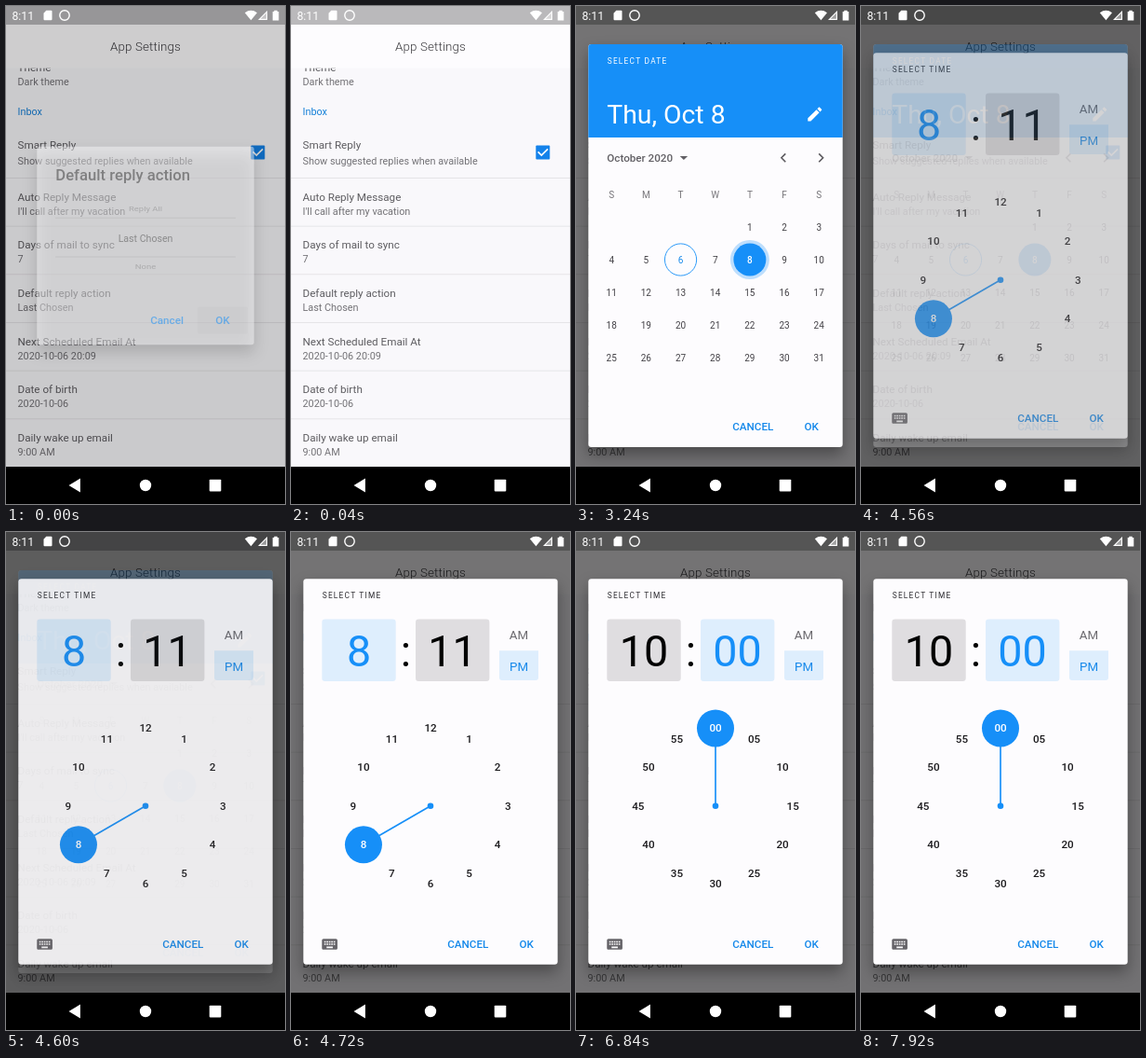
Recreate the animation shown at these times as an HTML page. Size 300 px wide and 534 px high, loop 8000 ms.

```html
<!DOCTYPE html>
<html lang="en">
<head>
<meta charset="utf-8">
<title>App settings pickers</title>
<style>
html, body { margin: 0; width: 100%; height: 100%; overflow: hidden; background: #000; }
svg { display: block; width: 100vw; height: 100vh; }
text { font-family: Roboto, "Open Sans", sans-serif; white-space: pre; }
.dialog { filter: drop-shadow(0 8px 8px rgba(0, 0, 0, .34)); }
</style>
</head>
<body>
<svg id="stage" viewBox="0 0 300 534" xmlns="http://www.w3.org/2000/svg"></svg>
<script>
const LOOP = 8000, STEP = 40;
const BLUE = '#168ff8', PAPER = '#fdfcfe', TINT = '#deeefd', GREY = '#dfdde0';
const CX = 150, CY = 293.7, DIAL = 83.2, KNOB = 20;
const BODY = 11.67;

const stage = document.getElementById('stage');
const $ = id => document.getElementById(id);

function attrs(o) {
  return Object.entries(o).map(([k, v]) => ` ${k}="${v}"`).join('');
}
function text(s, x, y, size, fill, more = {}) {
  return `<text${attrs({ x, y, 'font-size': size, fill, ...more })}>${s}</text>`;
}
function rect(x, y, width, height, fill, more = {}) {
  return `<rect${attrs({ x, y, width, height, fill, ...more })}/>`;
}
function circle(cx, cy, r, fill, more = {}) {
  return `<circle${attrs({ cx, cy, r, fill, ...more })}/>`;
}
function path(d, more = {}) {
  return `<path${attrs({ d, ...more })}/>`;
}
const MID = { 'text-anchor': 'middle' };
const MEDIUM = { 'font-weight': 500 };
const MID_MEDIUM = { ...MID, ...MEDIUM };

function settings() {
  const title = (s, y) => text(s, 12.5, y, BODY, '#5e5d61');
  const note = (s, y) => text(s, 12.5, y, 10.83, '#737276');
  const rows = [
    ['Auto Reply Message', 'I\'ll call after my vacation'],
    ['Days of mail to sync', '7'],
    ['Default reply action', 'Last Chosen'],
    ['Next Scheduled Email At', '2020-10-06 20:09'],
    ['Date of birth', '2020-10-06'],
    ['Daily wake up email', '9:00 AM']
  ];
  let out = rect(0, 0, 300, 494, '#f9f8fb');
  out += title('Theme', 70.3) + note('Dark theme', 85.2);
  out += text('Inbox', 12.5, 117.3, 10.83, '#1580d8');
  out += title('Smart Reply', 153.3) + note('Show suggested replies when available', 170.4);
  out += rect(263.3, 149.5, 15, 15, '#1482ea', { rx: 1 });
  out += path('M265.6 156.3l3.7 3.7 6.8-6.7', { fill: 'none', stroke: '#fff', 'stroke-width': 1.67 });
  rows.forEach(([head, sub], i) => {
    const y = 184.4 + i * 51.67;
    out += rect(0, y - .4, 300, .9, '#e4e3e6') + title(head, y + 24.2) + note(sub, y + 39.2);
  });
  out += rect(0, 0, 300, 66.7, PAPER);
  out += text('App Settings', 150, 48, 13.33, '#3c3b3f',
    { ...MID, 'font-weight': 300, 'letter-spacing': .15 });
  return out + rect(0, 0, 300, 20, '#bab9bb');
}

function systemBars() {
  return text('8:11', 6.5, 14.7, 12.2, '#fff') +
    path('M43.3 4.8h5.2q1 0 1 1v8.4q0 1-1 1h-7q-1 0-1-1v-6.4z', { fill: '#fff' }) +
    circle(63, 10, 5.2, 'none', { stroke: '#fff', 'stroke-width': 1.4 }) +
    path('M256.8 7.2q6.6-4.7 13.2 0l-6.6 8z', { fill: '#fff' }) +
    path('M281 5.2v9.8h-9.8z', { fill: '#fff', 'fill-opacity': .45 }) +
    path('M280.4 6.4v8h-8z', { fill: 'none', stroke: '#fff', 'stroke-width': 1.1 }) +
    path('M288.3 4.8h3.4v1.1h1.6v9.6h-6.6v-9.6h1.6z', { fill: '#fff' }) +
    rect(0, 494, 300, 40, '#000') +
    path('M67.5 514l12.4-7.4v14.8z', { fill: '#fff' }) +
    circle(150, 514, 6.2, '#fff') +
    rect(218.7, 507.8, 12.6, 12.6, '#fff', { rx: .8 });
}

function replyDialog() {
  const line = y => rect(53, y, 194, .8, '#777', { opacity: .2 });
  const squashed = (s, y) =>
    `<g transform="translate(150 ${y}) scale(1 .68)">${text(s, 0, 0, 9.5, '#555', { ...MID, opacity: .3 })}</g>`;
  return `<g class="dialog">${rect(33.3, 150.7, 233.4, 212.6, PAPER, { rx: 3, opacity: .45 })}</g>` +
    text('Default reply action', 53.3, 186.7, 16.67, '#333', { ...MEDIUM, opacity: .5 }) +
    squashed('Reply All', 219.7) + line(226.8) +
    text('Last Chosen', 150, 252.6, 10.6, '#444', { ...MID, opacity: .5 }) +
    line(268.6) + squashed('None', 282.2) +
    rect(206, 322.5, 54, 29, '#888', { rx: 2, opacity: .06 }) +
    text('Cancel', 173, 341, BODY, BLUE, { ...MID_MEDIUM, opacity: .55 }) +
    text('OK', 233, 341, BODY, BLUE, { ...MID_MEDIUM, opacity: .55 });
}

function actions(y) {
  return text('CANCEL', 190.3, y, BODY, '#1488ea', MID_MEDIUM) +
    text('OK', 253.2, y, BODY, '#1488ea', MID_MEDIUM);
}
function overline(s, y, fill) {
  return text(s, 33.7, y, 8.33, fill, { 'letter-spacing': 1.25 });
}

const dayX = col => 38.2 + col * 37.17;

function dateDialog() {
  let out = `<g class="dialog">${rect(13.3, 41, 273.4, 432, PAPER, { rx: 3.3 })}</g>`;
  out += path('M13.3 141V44.3q0-3.3 3.3-3.3h266.8q3.3 0 3.3 3.3V141z', { fill: BLUE });
  out += overline('SELECT DATE', 61.8, '#fff');
  out += text('', 33.3, 126.4, 28.33, '#fff', { id: 'headline' });
  out += path('M3 17.25V21h3.75L17.81 9.94l-3.75-3.75L3 17.25zM20.71 7.04c.39-.39.39-1.02 0-1.41l-2.34-2.34c-.39-.39-1.02-.39-1.41 0l-1.83 1.83 3.75 3.75 1.83-1.83z',
    { fill: '#fff', transform: 'translate(246.8 106) scale(.833)' });
  out += text('October 2020', 33.3, 166.9, BODY, '#615f64', MEDIUM);
  out += path('M111.7 160.9h8.4l-4.2 4.2z', { fill: '#615f64' });
  const arrow = { fill: 'none', stroke: '#5b595e', 'stroke-width': 1.6 };
  out += path('M225.3 158.4l-4.4 4.4 4.4 4.4', arrow) + path('M261.2 158.4l4.4 4.4-4.4 4.4', arrow);
  [...'SMTWTFS'].forEach((d, i) => out += text(d, dayX(i), 205.5, 10, '#77757a', MID));
  out += circle(dayX(4), 272, 21, BLUE, { id: 'halo' });
  out += circle(dayX(2), 272, 17.1, 'none', { id: 'today', stroke: BLUE, 'stroke-width': .9 });
  out += circle(0, 272, 17.5, BLUE, { id: 'picked' });
  for (let d = 1; d <= 31; d++) {
    const cell = d + 3;
    out += text(d, dayX(cell % 7), 240.6 + Math.floor(cell / 7) * 35, 10, '#434146',
      { ...MID, id: 'day' + d });
  }
  return out + actions(455.3);
}

function timeDialog() {
  const big = (s, x, more) => text(s, x, 143.7, 46.67, '#000', { ...MID, ...more });
  const labels = (name, fill) => {
    let out = '';
    for (let i = 0; i < 12; i++) {
      const a = i * Math.PI / 6;
      out += text('', CX + DIAL * Math.sin(a), CY - DIAL * Math.cos(a) + 3.9, BODY, fill,
        { ...MID_MEDIUM, id: name + i });
    }
    return out;
  };
  return `<g class="dialog">${rect(13.3, 50.3, 273.4, 413.4, PAPER, { rx: 3.3 })}</g>` +
    overline('SELECT TIME', 71, '#2f2e32') +
    rect(33.3, 93.6, 79.4, 66.4, TINT, { id: 'hourBox', rx: 3.3 }) + big('', 73, { id: 'hour' }) +
    big(':', 123.3) +
    rect(134, 93.6, 79.4, 66.4, GREY, { id: 'minBox', rx: 3.3 }) + big('', 173.6, { id: 'minute' }) +
    path('M224 127.3h42v28.7q0 3-3 3h-36q-3 0-3-3z', { fill: TINT }) +
    text('AM', 245, 115.2, 13.33, '#6b696e', MID) +
    text('PM', 245, 148.9, 13.33, '#1488ea', MID) +
    labels('dark', '#1c1b1e') +
    circle(CX, CY, 3.3, BLUE) +
    `<line id="hand" x1="${CX}" y1="${CY}" stroke="${BLUE}" stroke-width="1.67"/>` +
    circle(0, 0, KNOB, BLUE, { id: 'knob' }) +
    circle(0, 0, 1.7, '#fff', { id: 'pip' }) +
    `<clipPath id="knobClip">${circle(0, 0, KNOB, '#000', { id: 'knobHole' })}</clipPath>` +
    `<g clip-path="url(#knobClip)">${labels('light', '#fff')}</g>` +
    path('M20 5H4c-1.1 0-1.99.9-1.99 2L2 17c0 1.1.9 2 2 2h16c1.1 0 2-.9 2-2V7c0-1.1-.9-2-2-2zm-9 3h2v2h-2V8zm0 3h2v2h-2v-2zM8 8h2v2H8V8zm0 3h2v2H8v-2zm-1 2H5v-2h2v2zm0-3H5V8h2v2zm9 7H8v-2h8v2zm0-4h-2v-2h2v2zm0-3h-2V8h2v2zm3 3h-2v-2h2v2zm0-3h-2V8h2v2z',
      { fill: '#666469', transform: 'translate(31.6 432) scale(.833)' }) +
    actions(446);
}

stage.innerHTML = settings() +
  rect(0, 0, 300, 494, '#000', { id: 'scrim' }) +
  `<g id="reply">${replyDialog()}</g>` +
  `<g id="date">${dateDialog()}</g>` +
  `<g id="time">${timeDialog()}</g>` +
  systemBars();

function set(id, o) {
  const el = $(id);
  for (const k in o) el.setAttribute(k, o[k]);
}
function show(id, opacity) {
  set(id, { opacity, display: opacity > 0 ? 'inline' : 'none' });
}

// Linear interpolation through [time, value] stops.
function track(t, stops) {
  if (t <= stops[0][0]) return stops[0][1];
  for (let i = 1; i < stops.length; i++) {
    const [t0, a] = stops[i - 1], [t1, b] = stops[i];
    if (t <= t1) return a + (b - a) * (t - t0) / (t1 - t0);
  }
  return stops[stops.length - 1][1];
}

// cubic-bezier(.4, 0, .2, 1)
function ease(x) {
  let lo = 0, hi = 1;
  for (let i = 0; i < 24; i++) {
    const s = (lo + hi) / 2, r = 1 - s;
    if (1.2 * r * r * s + .6 * r * s * s + s * s * s < x) lo = s; else hi = s;
  }
  return lo * lo * (3 - 2 * lo);
}

function drawDate(t) {
  const moved = t >= 3240;
  $('headline').textContent = moved ? 'Thu, Oct 8' : 'Tue, Oct 6';
  set('picked', { cx: dayX(moved ? 4 : 2) });
  show('today', moved ? 1 : 0);
  show('halo', moved ? track(t, [[3240, .28], [3400, 0]]) : 0);
  set('day6', { fill: moved ? '#1488ea' : '#fff', 'font-weight': moved ? 400 : 500 });
  set('day8', { fill: moved ? '#fff' : '#434146', 'font-weight': moved ? 500 : 400 });
}

function drawTime(t) {
  const minutes = t >= 5920;
  $('hour').textContent = minutes ? '10' : '8';
  $('minute').textContent = t >= 6840 ? '00' : '11';
  set('hour', { fill: minutes ? '#000' : BLUE });
  set('minute', { fill: minutes ? BLUE : '#000' });
  set('hourBox', { fill: minutes ? GREY : TINT });
  set('minBox', { fill: minutes ? TINT : GREY });
  for (let i = 0; i < 12; i++) {
    const label = minutes ? String(i * 5).padStart(2, '0') : i || 12;
    $('dark' + i).textContent = $('light' + i).textContent = label;
  }
  let deg = 240;
  if (minutes) deg = t >= 6840 ? 360 : 300 + 126 * ease(Math.min(1, (t - 5920) / 200));
  const a = deg * Math.PI / 180;
  const x = CX + DIAL * Math.sin(a), y = CY - DIAL * Math.cos(a);
  set('hand', { x2: x, y2: y });
  for (const id of ['knob', 'knobHole', 'pip']) set(id, { cx: x, cy: y });
  const off = deg % 30;
  show('pip', off > 4.2 && off < 24.3 ? 1 : 0);
}

function draw(ms) {
  const t = Math.floor(ms / STEP) * STEP;
  // The scrims of the closing and the opening dialog overlap for a moment.
  const dim = track(t, [[4400, .54], [4600, .63], [4720, .54]]);
  show('scrim', t < 40 ? .19 : t < 1720 ? 0 : dim);
  show('reply', t < 40 ? 1 : 0);
  show('date', t < 1720 ? 0 : t < 4400 ? 1 :
    track(t, [[4400, .85], [4480, .5], [4600, .15], [4720, 0]]));
  show('time', track(t, [[4440, 0], [4520, .4], [4600, .88], [4720, 1]]));
  drawDate(t);
  drawTime(t);
}

const start = performance.now();
function tick() {
  draw((performance.now() - start) % LOOP);
  requestAnimationFrame(tick);
}
draw(0);
requestAnimationFrame(tick);
</script>
</body>
</html>
```
